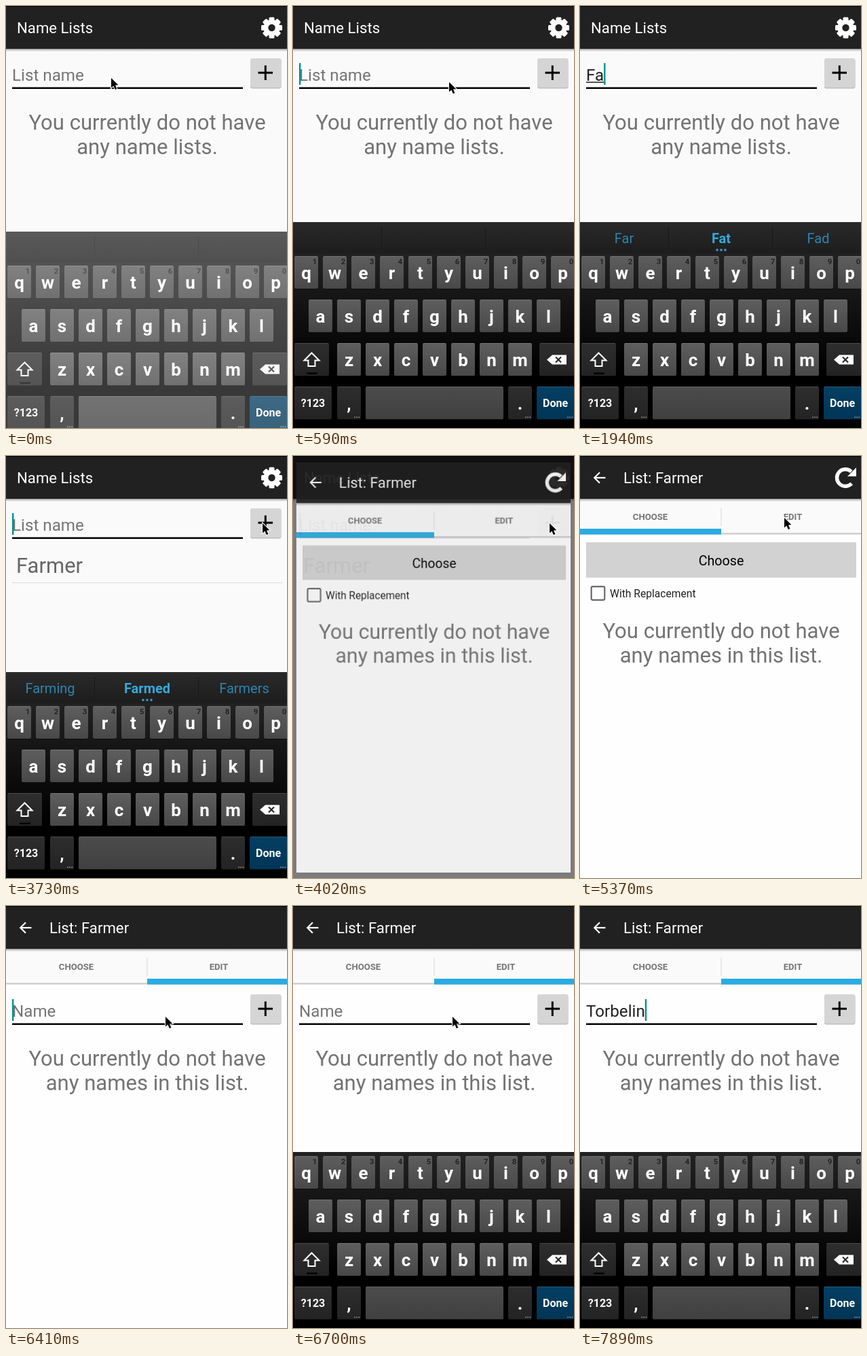
Recreate the animation shown at these times as an HTML page with a canvas. Size 414 px wide and 621 px high, loop 8000 ms.

```html
<!DOCTYPE html>
<html lang="en">
<head>
<meta charset="utf-8">
<title>Name Lists</title>
<style>
  html, body { margin: 0; width: 100%; height: 100%; overflow: hidden; background: #fafafa; }
  canvas { display: block; }
</style>
</head>
<body>
<canvas id="stage" width="414" height="621"></canvas>
<script>
const W = 414, H = 621, LOOP = 8000, TICK = 149;
const LIST = 'Farmer', PERSON = 'Torbelin';
const GREY = '#737373', BLUE = '#2aabe2', TEAL = '#009688';

const screen = document.getElementById('stage').getContext('2d');
const scratch = Object.assign(document.createElement('canvas'), { width: W, height: H }).getContext('2d');
let c = screen;

// Step tables: [tick, ...values]; each entry holds until the next one.
const POINTER = [[0, 155, 106], [4, 230, 112], [5, 330, 108], [6], [19, 402, 92], [20, 396, 95],
  [21, 389, 97], [22, 383, 98], [23, 378, 99], [31, 223, 112], [34, 279, 100], [36, 301, 91],
  [39, 285, 112], [40, 262, 138], [41, 240, 155], [43, 235, 163], [49]];
const LIST_TYPING = [[-4, 0], [11, 1], [13, 2], [14, 3], [15, 4], [16, 6], [25, 0]];
const NAME_TYPING = [[41, 0], [49, 1], [50, 3], [51, 5], [52, 7], [53, 8]];
const SUGGESTIONS = [[0, '', '', ''], [12, 'Far', 'Fat', 'Fad'], [14, 'Farce', 'Farm', 'Farms'],
  [16, 'Farming', 'Farmed', 'Farmers']];
const at = (steps, k) => steps.findLast(s => s[0] <= k) || steps[0];

function rect(x, y, w, h, fill, radius = 0) {
  c.fillStyle = fill;
  c.beginPath();
  c.roundRect(x, y, w, h, radius);
  c.fill();
}

function text(str, x, y, size, fill, align = 'left', weight = 400) {
  c.font = `${weight} ${size}px Roboto, sans-serif`;
  c.textAlign = align;
  c.fillStyle = fill;
  c.fillText(str, x, y);
}

function path(points, closed) {
  c.beginPath();
  points.forEach(([x, y]) => c.lineTo(x, y));
  if (closed) c.closePath();
}

function stroke(color, width) {
  c.strokeStyle = color;
  c.lineWidth = width;
  c.stroke();
}

function vertical(y0, y1, ...colors) {
  const g = c.createLinearGradient(0, y0, 0, y1);
  colors.forEach((color, i) => g.addColorStop(i / (colors.length - 1), color));
  return g;
}

// Draws a group off screen, then places it as one translucent layer.
function layer(draw, alpha, scale = 1, dy = 0) {
  c = scratch;
  c.clearRect(0, 0, W, H);
  draw();
  c = screen;
  c.save();
  c.globalAlpha = alpha;
  c.translate(W / 2, H / 2 + dy);
  c.scale(scale, scale);
  c.drawImage(scratch.canvas, -W / 2, -H / 2);
  c.restore();
}

function header(title, x) {
  rect(0, 63, W, 4, vertical(63, 67, '#00000059', '#00000000'));
  rect(0, 0, W, 63, '#212121');
  rect(0, 0, W, 1, '#000');
  text(title, x, 40, 22.2, '#fff');
}

function gear() {
  c.save();
  c.translate(391.5, 32);
  for (let i = 0; i < 4; i++) {
    rect(-4, -15.5, 8, 31, '#fff', 1.5);
    c.rotate(Math.PI / 4);
  }
  c.beginPath();
  c.arc(0, 0, 8.6, 0, 7);
  stroke('#fff', 7);
  c.beginPath();
  c.arc(0, 0, 5.2, 0, 7);
  c.fillStyle = '#212121';
  c.fill();
  c.restore();
}

function reload() {
  c.beginPath();
  c.arc(391, 32, 12.5, 0.75, -0.8);
  stroke('#fff', 5.4);
  path([[407, 17], [407, 30], [394, 30]], true);
  c.fillStyle = '#fff';
  c.fill();
}

function backArrow() {
  path([[37.5, 32], [21.5, 32]]);
  stroke('#fff', 2.2);
  path([[29, 24.3], [21.3, 32], [29, 39.7]]);
  stroke('#fff', 2.2);
}

function field(y, hint, typed, caret, composing) {
  text(typed || hint, 9, y + 110, 24.2, typed ? '#212121' : '#757575');
  const end = 9 + (typed ? c.measureText(typed).width : 0);
  if (typed && composing) rect(9, y + 111.5, end - 9, 1.5, '#212121');
  if (caret) rect(end, y + 84, 2.4, 32, TEAL);
  rect(9, y + 119.5, 340, 2.5, '#000');
  rect(360, y + 78, 45.5, 43.5, '#bdbdbd', 3);
  rect(360, y + 77, 45.5, 43, '#d5d5d5', 3);
  rect(371.5, y + 96.7, 21.5, 3, '#000');
  rect(380.8, y + 87.5, 3, 21.5, '#000');
}

function message(y, secondLine) {
  text('You currently do not have', 208, y, 31.1, GREY, 'center');
  text(secondLine, 208, y + 36, 31.1, GREY, 'center');
}

function typing(steps, word, k) {
  const [start, count] = at(steps, k);
  return { typed: word.slice(0, count), caret: (k - start) * TICK % 1000 < 500 };
}

function listPage(k) {
  rect(0, 0, W, H, '#fafafa');
  header('Name Lists', 16);
  gear();
  const { typed, caret } = typing(LIST_TYPING, LIST, k);
  field(0, 'List name', typed, caret, true);
  if (k < 25) return message(182, 'any name lists.');
  text(LIST, 15, 171.5, 31, '#666');
  rect(9, 186, 398, 1, '#dcdcdc');
}

function chooseTab() {
  rect(9, 127, 398, 52, '#d2d2d2');
  text('Choose', 208, 160.5, 19.7, '#000', 'center');
  c.beginPath();
  c.roundRect(16.7, 192.2, 19.6, 19.6, 2);
  stroke('#6a6a6a', 2.2);
  text('With Replacement', 44, 208.3, 15.65, '#212121');
  message(268, 'any names in this list.');
}

function editTab(k) {
  const { typed, caret } = typing(NAME_TYPING, PERSON, k);
  field(53, 'Name', typed, caret && k > 40, false);
  message(235, 'any names in this list.');
}

function detailPage(k) {
  rect(0, 0, W, H, '#fefefe');
  const u = Math.min(1, Math.max(0, (k - 37) / 4));
  const slide = 1 - (1 - u) ** 3;
  c.save();
  c.translate(-slide * W, 0);
  if (slide < 1) chooseTab();
  c.translate(W, 0);
  if (slide > 0) editTab(k);
  c.restore();

  rect(0, 63, W, 52, '#fafafa');
  rect(0, 113, W, 2.5, '#d0d0d0');
  rect(slide * 208, 107, 208, 8.5, BLUE);
  rect(207.5, 76, 1, 27, '#d8d8d8');
  text('CHOOSE', 103.5, 94.3, 13.1, '#757575', 'center', 700);
  text('EDIT', 313.5, 94.3, 13.1, '#757575', 'center', 700);
  header('List: ' + LIST, 64);
  backArrow();
  if (k < 41) reload();
}

function key(x, y, w, label, { fill = ['#5e5e5e', '#484848'], size = 26, hint, more } = {}) {
  rect(x, y, w, 49, '#0b0b0b', 2);
  rect(x, y, w, 48, vertical(y, y + 48, ...fill), 2);
  rect(x + 1, y, w - 2, 1, '#ffffff22');
  text(label, x + w / 2, y + (size > 20 ? 34 : 30), size, '#fff', 'center', 700);
  if (hint) text(hint, x + 30, y + 11.5, 11.5, '#242424', 'center', 700);
  if (more) text('...', x + w - 1, y + 46, 11, '#aaa', 'right', 700);
}

function shiftIcon() {
  path([[27.5, 510.5], [38.5, 521.5], [32.5, 521.5], [32.5, 530], [22.5, 530], [22.5, 521.5], [16.5, 521.5]], true);
  stroke('#fff', 2);
  rect(20, 539.5, 16, 2.5, '#000', 1);
}

function deleteIcon() {
  path([[374, 520.5], [382, 513.5], [403, 513.5], [403, 527.5], [382, 527.5]], true);
  c.fillStyle = '#fff';
  c.fill();
  for (const d of [-4, 4]) {
    path([[387, 520.5 - d], [395, 520.5 + d]]);
    stroke('#2a2a2a', 2.2);
  }
}

function suggestionBar(words) {
  rect(0, 318, W, 46, vertical(318, 364, '#2a2a2a', '#1d1d1d'));
  rect(130, 325, 1, 34, '#191919');
  rect(283, 325, 1, 34, '#191919');
  words.forEach((word, i) => text(word, 65 + i * 143, 349, 20,
    i === 1 ? '#33a9dc' : '#2b86b0', 'center', i === 1 ? 700 : 400));
  if (words[1]) for (let i = -1; i < 2; i++) rect(206.5 + i * 6, 357.5, 3, 3, '#33a9dc');
}

function keyboard(words) {
  const dark = { fill: ['#2e2e2e', '#232323'], size: 16 };
  rect(0, 362, W, H - 362, vertical(362, 540, '#222', '#111', '#000'));
  if (words) suggestionBar(words);
  [...'qwertyuiop'].forEach((ch, i) => key(2 + i * 42, 368, 35, ch, { hint: String((i + 1) % 10) }));
  [...'asdfghjkl'].forEach((ch, i) => key(23 + i * 42, 432, 35, ch));
  [...'zxcvbnm'].forEach((ch, i) => key(65 + i * 42, 496, 35, ch));
  key(2, 496, 51, '', dark);
  key(363, 496, 51, '', dark);
  shiftIcon();
  deleteIcon();
  key(2, 560, 55, '?123', dark);
  key(65, 560, 35, ',', { ...dark, size: 26, more: true });
  key(107, 560, 203, '', { fill: ['#4c4c4c', '#404040'] });
  key(317, 560, 35, '.', { ...dark, size: 26, more: true });
  key(359, 560, 55, 'Done', { fill: ['#053f63', '#003556'], size: 16, more: true });
}

function pointer(x, y) {
  if (x === undefined) return;
  path([[0, 0], [0, 14.5], [3.4, 11.4], [5.8, 17], [8.4, 16], [6, 10.4], [10.4, 10.2]]
    .map(([dx, dy]) => [x + dx, y + dy]), true);
  stroke('#fff', 2);
  c.fillStyle = '#000';
  c.fill();
}

function draw(now) {
  const k = Math.floor((now % LOOP + 10) / TICK);
  c = screen;
  if (k < 28) listPage(k);
  if (k > 25) {
    // The new page grows and fades in over the dimmed list.
    const u = Math.min(1, (k - 25) / 3), rest = (1 - u) ** 2;
    rect(0, 0, W, H, `rgba(0, 0, 0, ${0.75 * u})`);
    layer(() => detailPage(k), 1 - rest, 1 - 0.225 * rest);
  }
  const words = k < 26 && at(SUGGESTIONS, k).slice(1);
  const rising = k === 0 || k === 44;
  if (k < 26 || k > 43) layer(() => keyboard(words), rising ? 0.77 : 1, 1, rising ? 14 : 0);
  pointer(...at(POINTER, k).slice(1));
  requestAnimationFrame(() => draw(performance.now()));
}
draw(0);
</script>
</body>
</html>
```
